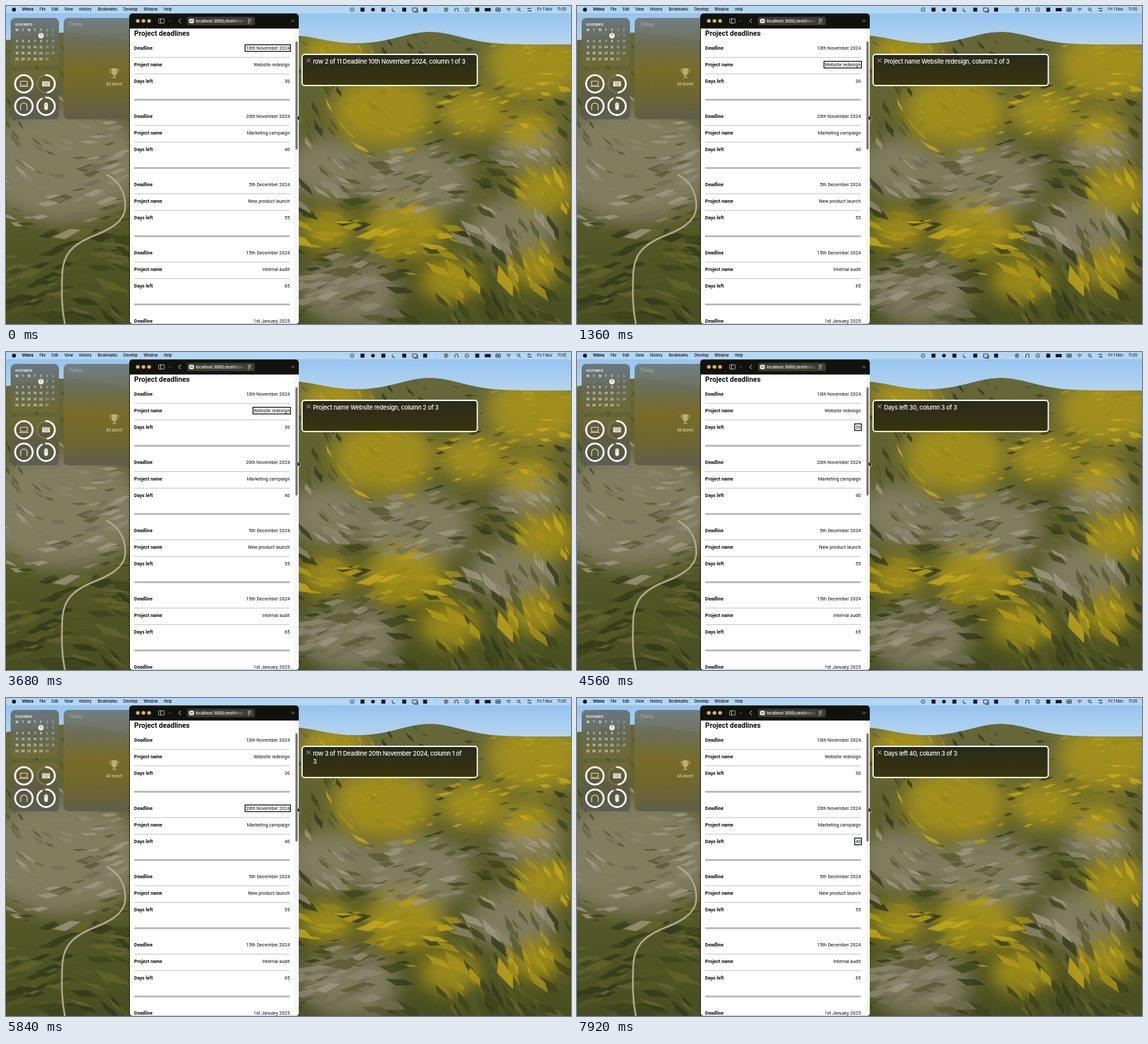
An HTML page for the animation above (8000 ms loop, 853 by 480 pixels).

```html
<!DOCTYPE html>
<html lang="en">
<head>
<meta charset="utf-8">
<title>Project deadlines</title>
<style>
html, body { margin: 0; width: 100%; height: 100%; overflow: hidden; background: #53581f; }
svg { display: block; width: 100vw; height: 100vh; }
text { font-family: Inter, "Liberation Sans", sans-serif; white-space: pre; }
.page text { font-family: Roboto, "Open Sans", sans-serif; font-size: 7.1px; fill: #0b0c0c; }
.caption text { font-size: 9.2px; font-weight: 500; letter-spacing: -.03em; fill: #fff; }
</style>
</head>
<body>
<svg id="stage" viewBox="0 0 853 480">
  <defs>
    <filter id="haze" x="-50%" y="-50%" width="200%" height="200%"><feGaussianBlur stdDeviation="14"/></filter>
    <filter id="soft"><feGaussianBlur stdDeviation=".5"/></filter>
  </defs>
</svg>
<script>
const NS = 'http://www.w3.org/2000/svg';
const stage = document.getElementById('stage');
const defs = stage.querySelector('defs');

function add(parent, tag, attrs = {}) {
  const el = document.createElementNS(NS, tag);
  for (const key in attrs) el.setAttribute(key, attrs[key]);
  return parent.appendChild(el);
}
const group = attrs => add(stage, 'g', attrs);
const rect = (g, x, y, width, height, fill, more) => add(g, 'rect', { x, y, width, height, fill, ...more });
const circle = (g, cx, cy, r, fill, more) => add(g, 'circle', { cx, cy, r, fill, ...more });
const line = (g, d, stroke, width = 1, more) =>
  add(g, 'path', { d, fill: 'none', stroke, 'stroke-width': width, ...more });
function text(g, x, y, content, more) {
  const el = add(g, 'text', { x, y, ...more });
  el.textContent = content;
  return el;
}

// Evenly spaced colours; returns a fill value.
function gradient(id, colors, attrs = { x1: 0, y1: 0, x2: 0, y2: 1 }) {
  const el = add(defs, 'linearGradient', { id, ...attrs });
  colors.forEach((c, i) => add(el, 'stop', { offset: i / (colors.length - 1), 'stop-color': c }));
  return `url(#${id})`;
}

let seed = 7;
function random() {
  seed = (seed * 16807) % 2147483647;
  return seed / 2147483647;
}
const pick = list => list[Math.floor(random() * list.length)];

const tones = {
  flower: ['#b59d18', '#cbad1c', '#94851b', '#a8931a'],
  rock: ['#8e8872', '#a19b84', '#716d56', '#57572f'],
  grass: ['#3d431b', '#535825', '#30361a', '#64652e']
};
// Centres and reaches of the flowering and rocky slopes.
const slopes = {
  flower: [[570, 158, 78], [705, 160, 50], [787, 185, 42], [600, 338, 62], [800, 88, 75],
    [495, 72, 52], [815, 278, 48], [670, 414, 46], [800, 396, 42], [485, 338, 42]],
  rock: [[85, 240, 125], [490, 245, 65], [620, 265, 80], [520, 430, 75], [765, 335, 65], [790, 218, 50]]
};

const bump = (x, at, width) => Math.exp(-(((x - at) / width) ** 2));
const horizon = x => 58 - 19 * bump(x, 640, 65) - 14 * bump(x, 430, 60) - 18 * bump(x, 90, 90);

function nearness(kind, x, y) {
  return Math.max(...slopes[kind].map(([cx, cy, r]) => 1 - Math.hypot(x - cx, (y - cy) * 1.35) / r));
}
function toneAt(x, y) {
  const flower = nearness('flower', x, y) + (random() - .5) * .7;
  const rock = nearness('rock', x, y) + (random() - .5) * .7;
  if (Math.max(flower, rock) < 0) return 'grass';
  return flower > rock ? 'flower' : 'rock';
}

// A slim leaf shape lying along the slope.
function facet(x, y) {
  const angle = .45 + .7 * Math.sin(x / 75 + y / 100);
  const length = (5 + y / 28) * (.4 + random());
  const bend = length * (.15 + random() * .3);
  const dx = Math.cos(angle), dy = Math.sin(angle);
  const at = (along, across) =>
    `${(x + dx * along - dy * across).toFixed(1)} ${(y + dy * along + dx * across).toFixed(1)}`;
  return `M${at(-length, 0)}L${at(-length * .2, bend)}L${at(length, 0)}L${at(length * .3, -bend * .7)}Z`;
}

function drawLandscape() {
  rect(stage, 0, 0, 853, 80, gradient('sky', ['#8fc0ee', '#c3dcf0']));
  const ridge = [];
  for (let x = 0; x <= 856; x += 8) ridge.push(`${x} ${horizon(x).toFixed(1)}`);
  const d = `M0 480L${ridge.join('L')}V480Z`;
  add(add(defs, 'clipPath', { id: 'land' }), 'path', { d });

  const g = group({ 'clip-path': 'url(#land)' });
  add(g, 'path', { d, fill: gradient('ground', ['#66683a', '#5a5c2a', '#484e20']) });
  for (const kind of ['rock', 'flower'])
    for (const [cx, cy, r] of slopes[kind])
      add(g, 'ellipse', { cx, cy, rx: r, ry: r * .7, fill: tones[kind][0], opacity: .75, filter: 'url(#haze)' });

  const layers = {};
  for (let i = 0; i < 1100; i++) {
    const x = random() * 853;
    const top = horizon(x) + 3;
    const y = top + random() * (480 - top);
    const color = pick(tones[toneAt(x, y)]);
    layers[color] = (layers[color] || '') + facet(x, y);
  }
  const facets = add(g, 'g', { filter: 'url(#soft)', opacity: .75 });
  for (const fill in layers) add(facets, 'path', { d: layers[fill], fill });

  // Winding track
  line(g, 'M90 485C83 455 84 430 85 402C87 374 101 361 125 350C148 341 179 329 180 304C181 280 169 264 153 255',
    '#b0ab90', 2.6, { 'stroke-linecap': 'round' });
}

const HEADPHONES = 'M-5 3V0A5 5 0 0 1 5 0V3M-4.7 1V6M4.7 1V6';

function drawMenuBar() {
  const g = group();
  const ink = '#15191d';
  rect(g, 0, 0, 853, 11, '#c2e0f6', { opacity: .7 });
  circle(g, 12, 5.5, 3, '#111');
  const menu = text(g, 24, 7.4, '', { 'font-size': 5.5, 'font-weight': 500 });
  'Velora File Edit View History Bookmarks Develop Window Help'.split(' ').forEach((name, i) => {
    add(menu, 'tspan', i ? { dx: 9.2 } : { 'font-weight': 700 }).textContent = name;
  });
  text(g, 802, 7.4, 'Fri 1 Nov', { 'font-size': 5.6 });
  text(g, 846, 7.4, '11:05', { 'font-size': 5.8, 'text-anchor': 'end' });

  // Status icons, drawn around their own centre.
  const ring = 'M-2.8 0A2.8 2.8 0 1 1 2.8 0A2.8 2.8 0 1 1 -2.8 0';
  const frame = 'M-3.3 -2.5H3.3V2.5H-3.3Z';
  const solid = { disc: ring, square: 'M-3 -3H3V3H-3Z', moon: 'M-1 -3A3.2 3.2 0 1 0 3 1.5A3 3 0 0 1 -1 -3', battery: 'M-4.5 -2.5H4.5V2.5H-4.5Z' };
  const outline = {
    ring: ring + 'M0 -2V2M-1.5 -.5H1.5',
    target: ring + 'M-.8 0H.8',
    windows: frame + 'M-1 4H4.5V-1',
    grid: frame + 'M-3.3 0H3.3M0 -2.5V2.5',
    wave: 'M-3.3 -1Q0 -3.7 3.3 -1M-2.1 .7Q0 -1.1 2.1 .7M-.6 2.2H.6',
    search: 'M-2.6 -.6A2 2 0 1 1 1.4 -.6A2 2 0 1 1 -2.6 -.6M1 1L3 3',
    sliders: 'M-3 -1.8H3M-3 1.8H3M-1.5 -3V-.6M1.5 .6V3',
    phones: HEADPHONES
  };
  const icons = 'target square disc square moon square windows square - ring phones target square battery grid wave search sliders';
  icons.split(' ').forEach((name, i) => {
    const spot = add(g, 'g', { transform: `translate(${522.5 + i * 15.75} 5.5) scale(${name === 'phones' ? .5 : 1})` });
    if (solid[name]) add(spot, 'path', { d: solid[name], fill: ink });
    else if (outline[name]) line(spot, outline[name], ink, name === 'phones' ? 1.8 : .8);
    else line(spot, ring, '#8eabc1', .7, { 'stroke-dasharray': 1 });
  });
}

function drawCalendar(g) {
  text(g, 14, 30, 'NOVEMBER', { 'font-size': 4.5, 'font-weight': 700, fill: '#e6e7df' });
  const cell = (col, y, label, fill = col > 4 ? '#b1b2a6' : '#eeeee6') => text(g, 16.5 + col * 9.08, y, label,
    { 'font-size': 4.4, 'font-weight': 700, 'text-anchor': 'middle', fill });
  [...'MTWTFSS'].forEach((d, col) => cell(col, 37.8, d));
  circle(g, 52.8, 44.8, 4.1, '#f5f5f0');
  for (let day = 1; day <= 30; day++) {
    const slot = day + 3;
    cell(slot % 7, 46.4 + Math.floor(slot / 7) * 8.9, day, day === 1 ? '#555' : undefined);
  }
}

function drawDevices(g) {
  const icons = [
    'M-5 -4H5V2.5H-5ZM-7 4H7',
    'M-6 -4H6V4H-6ZM-4.5 -2H4.5M-4.5 0H4.5M-3 2H3',
    HEADPHONES,
    'M-3 -3A3 3 0 0 1 3 -3V3A3 3 0 0 1 -3 3ZM0 -4V-1'
  ];
  [1, .47, 1, .91].forEach((level, i) => {
    const spot = add(g, 'g', { transform: `translate(${27 + i % 2 * 33.5} ${117.5 + (i >> 1) * 33.8})` });
    const turn = 2 * Math.PI * 13.2;
    circle(spot, 0, 0, 13.2, '#4a4930', { 'fill-opacity': .25, stroke: '#89856b', 'stroke-width': 2.7, 'stroke-opacity': .55 });
    circle(spot, 0, 0, 13.2, 'none', {
      stroke: '#fff', 'stroke-width': 2.8, 'stroke-linecap': 'round',
      'stroke-dasharray': `${turn * level} ${turn}`, transform: 'rotate(-90)'
    });
    const filled = i % 2 === 1;
    add(spot, 'path', {
      d: icons[i], fill: filled ? '#f4f2e8' : 'none',
      stroke: filled ? '#7a7453' : '#ddd8bb', 'stroke-width': filled ? .7 : 1.2
    });
  });
}

function drawWidgets() {
  const g = group();
  const panel = (x, y, w, h, fill) => rect(g, x, y, w, h, fill, { rx: 7, opacity: .96 });
  panel(7, 18, 73, 73, gradient('calendar', ['#66747b', '#666955', '#706a32']));
  panel(7, 98, 73, 73, gradient('devices', ['#716a32', '#5d5b43', '#5b5c54']));
  panel(87, 18, 153, 153, gradient('today', ['#6f7c80', '#6d6e54', '#7a6c26', '#706730', '#5f5d4a']));
  drawCalendar(g);
  drawDevices(g);

  text(g, 95, 30.2, 'Today', { 'font-size': 7.2, 'font-weight': 500, fill: '#a5aaa0' });
  const trophy = add(g, 'g', { transform: 'translate(163.5 101)' });
  add(trophy, 'path', { d: 'M-4 -7H4V-1Q4 2.5 1 3.5V6.5H3.5V7.5H-3.5V6.5H-1V3.5Q-4 2.5 -4 -1Z', fill: '#b9b078' });
  line(trophy, 'M-4 -5H-6.8Q-6 0 -3 .5M4 -5H6.8Q6 0 3 .5', '#b9b078');
  text(g, 163.5, 120, 'All done!', { 'font-size': 6, 'font-weight': 500, 'text-anchor': 'middle', fill: '#d8d4b5' });
}

const PITCH = 103, ROW = 25, RIGHT = 428.4;
const labels = ['Deadline', 'Project name', 'Days left'];
const projects = [
  ['10th November 2024', 'Website redesign', 30],
  ['20th November 2024', 'Marketing campaign', 40],
  ['5th December 2024', 'New product launch', 55],
  ['15th December 2024', 'Internal audit', 65],
  ['1st January 2025', '', '']
];
const rowCentre = (project, column) => 63.5 + project * PITCH + column * ROW;

// Returns the value texts, by project and column.
function drawWindow() {
  const g = group({ class: 'page' });
  rect(g, 186, 11.2, 256, 468.6, '#11120c', { rx: 5 });
  add(g, 'path', { d: 'M187 34H442V475Q442 479.7 437.5 479.7H191.5Q187 479.7 187 475Z', fill: '#fff' });
  rect(g, 435, 34, 6.8, 442, '#f7f7f7');
  rect(g, 437, 53.3, 3.4, 163.5, '#777', { rx: 1.7 });
  text(g, 193.6, 44.7, 'Project deadlines', { style: 'font-size:10.7px', 'font-weight': 700 });
  return projects.map((values, i) => {
    rect(g, 193.5, rowCentre(i, 3) + 1.7, 235, 2.6, '#b1b4b6');
    return values.map((value, j) => {
      const y = rowCentre(i, j);
      text(g, 193.6, y + 2.6, labels[j], { 'font-weight': 700 });
      if (j < 2) rect(g, 193.5, y + 13.6, 235, .8, '#b1b4b6');
      return text(g, RIGHT, y + 2.6, value, { 'text-anchor': 'end' });
    });
  });
}

function drawToolbar() {
  const g = group();
  const ink = '#dcdcd2';
  for (let i = 0; i < 3; i++) circle(g, 199 + i * 8.5, 22.5, 2.8, '#dab655');
  rect(g, 230.5, 19.2, 8.5, 6.6, 'none', { stroke: ink, 'stroke-width': .8, rx: 1.2 });
  line(g, 'M233.5 19.2V25.8', ink, .8);
  line(g, 'M245.8 21.8L247.3 23.3L248.8 21.8', '#92928a', .8);
  line(g, 'M264 19.2L260.8 22.5L264 25.8', ink, 1);
  rect(g, 273.2, 16.2, 102.6, 12.8, '#3b3b32', { rx: 3.6 });
  rect(g, 276.2, 19.3, 7.6, 6.6, '#e3e3d9', { rx: 2 });
  line(g, 'M278 22.6H282', '#3b3b32', 1);
  const fade = gradient('urlFade', ['#f2f2ec', '#55554c'], { gradientUnits: 'userSpaceOnUse', x1: 340, x2: 360 });
  text(g, 286.5, 24.7, 'localhost:3000//test#main', { 'font-size': 5.7, 'font-weight': 600, fill: fade });
  line(g, 'M365 20H370.3M365 22H370.3M365 24H368M365 26H367M369 25H370.5', ink, .8);
  line(g, 'M431 20.7L432.8 22.5L431 24.3M433.5 20.7L435.3 22.5L433.5 24.3', '#a9a9a0', .8);
}

function drawCaption() {
  const g = group({ class: 'caption' });
  rect(g, 447, 73, 264.5, 47, gradient('captionFill', ['#29291a', '#3a3610']),
    { rx: 4, stroke: '#fff', 'stroke-width': 1.8 });
  line(g, 'M453.7 79.2L459.7 85.2M459.7 79.2L453.7 85.2', '#d8d8cf', .9);
  return [text(g, 463.4, 87.4, ''), text(g, 463.4, 99.2, '')];
}

function drawCursor() {
  add(group(), 'path', {
    d: 'M440 165.3V172.8L441.7 171.2L442.9 173.6L444 173.1L442.9 170.8H445.2Z',
    fill: '#111', stroke: '#fff', 'stroke-width': .4
  });
}

drawLandscape();
drawMenuBar();
drawWidgets();
const values = drawWindow();
drawToolbar();
const focus = rect(group(), 0, 0, 0, 10, 'none', { stroke: '#0b0c0c', 'stroke-width': 1.3 });
const captionLines = drawCaption();
drawCursor();

// Start time, focused project and column, spoken column if it runs ahead, row announcement.
const steps = [
  { at: 0, project: 0, column: 0, row: 'row 2 of 11 ' },
  { at: 880, project: 0, column: 1 },
  { at: 2600, project: 0, column: 1, spoken: 0 },
  { at: 2700, project: 0, column: 0 },
  { at: 3560, project: 0, column: 1 },
  { at: 4360, project: 0, column: 2 },
  { at: 5560, project: 1, column: 0, row: 'row 3 of 11 ', wrap: true },
  { at: 6680, project: 1, column: 1 },
  { at: 7700, project: 1, column: 2 }
];
const LOOP = 8000;
let shown = null;

function render(time) {
  const step = steps.findLast(s => s.at <= time % LOOP);
  if (step === shown) return;
  shown = step;
  const { project, column, spoken = column, row = '', wrap } = step;

  const width = values[project][column].getComputedTextLength() + 2.3;
  focus.setAttribute('x', RIGHT + 1.1 - width);
  focus.setAttribute('y', rowCentre(project, column) - 5);
  focus.setAttribute('width', width);

  const message = `${row}${labels[spoken]} ${projects[project][spoken]}, column ${spoken + 1} of`;
  captionLines[0].textContent = wrap ? message : message + ' 3';
  captionLines[1].textContent = wrap ? '3' : '';
}

function tick() {
  render(performance.now());
  requestAnimationFrame(tick);
}
tick();
</script>
</body>
</html>
```
